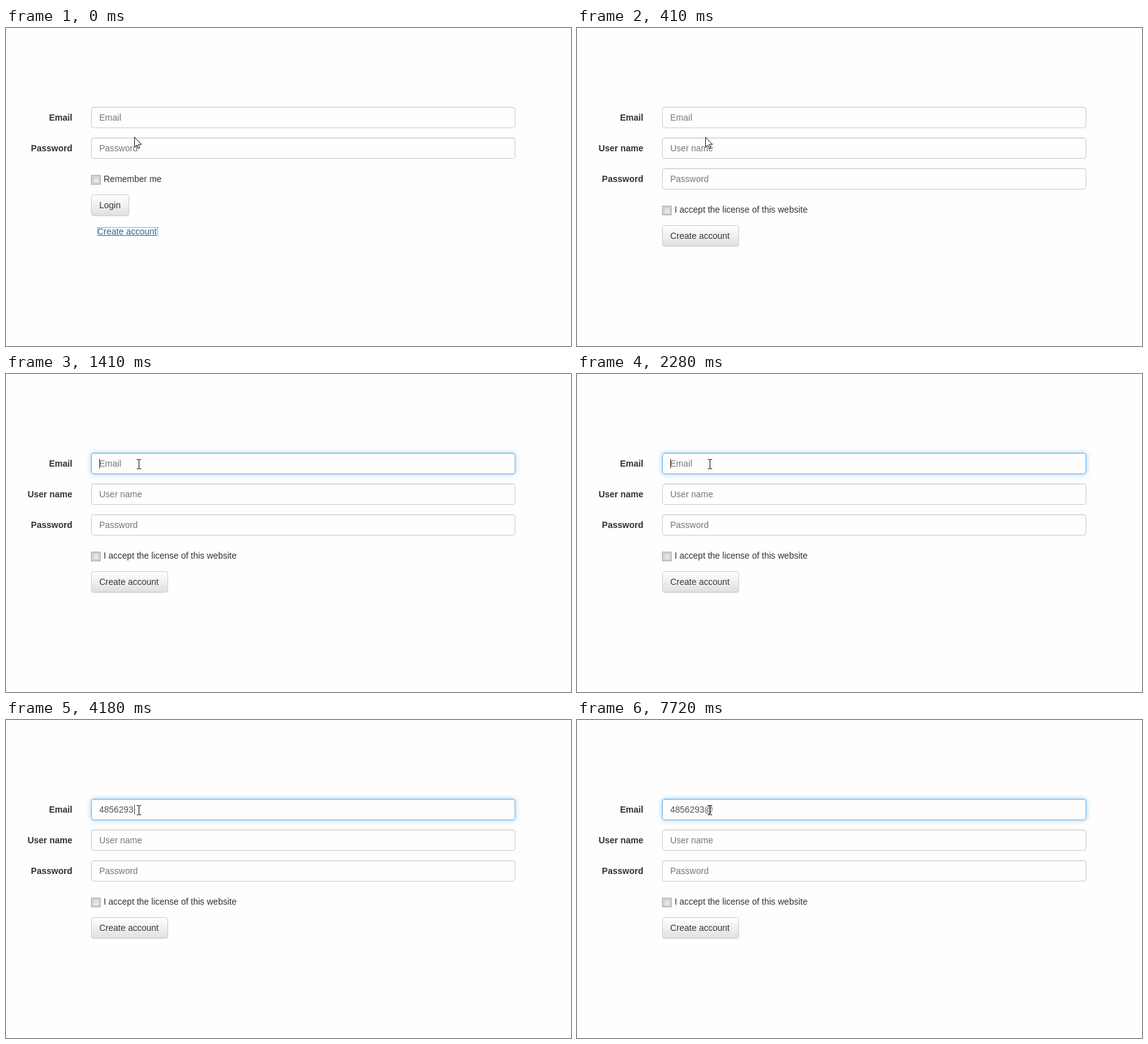
An HTML page that plays this animation: 903x508 px, repeating every 8 s.

```html
<!DOCTYPE html>
<html lang="en">
<head>
<meta charset="utf-8">
<title>Account form</title>
<style>
  html, body { margin: 0; width: 100%; height: 100%; overflow: hidden; background: #fefefe; }
  body { position: relative; font: 14px/20px "Liberation Sans", Arial, sans-serif; color: #333; }
  body * { box-sizing: border-box; }
  .row, .row > *, .check, .button, #link, #ring, #caret, svg { position: absolute; white-space: nowrap; }
  .row { left: 0; width: 903px; height: 34px; }
  .row b { right: 797px; top: 7px; }
  .field {
    left: 136px; width: 678px; height: 34px; padding: 6px 12px;
    border: 1px solid #ccc; border-radius: 4px; color: #777;
    box-shadow: inset 0 1px 1px rgba(0, 0, 0, .075);
  }
  .field.focusing { border-color: #aac1d6; }
  .field.focused {
    border-color: #66afe9;
    box-shadow: inset 0 1px 1px rgba(0, 0, 0, .075), 0 0 8px rgba(102, 175, 233, .6);
  }
  .field.typed { color: #555; }
  .check { left: 156px; }
  .check::before {
    content: ""; position: absolute; left: -20px; top: 4px; width: 13px; height: 13px;
    border: 1px solid #8e8f8f; box-shadow: inset 0 0 0 1px #f4f4f4, inset 0 0 0 2px #b4b8bc;
    background: linear-gradient(135deg, #cfd2d5, #f4f4f4);
  }
  .button {
    left: 136px; height: 34px; padding: 6px 12px; border: 1px solid #ccc; border-radius: 4px;
    background: linear-gradient(#fff, #e0e0e0); text-shadow: 0 1px 0 #fff;
    box-shadow: inset 0 1px 0 rgba(255, 255, 255, .15), 0 1px 1px rgba(0, 0, 0, .075);
  }
  #link { left: 146px; top: 315px; color: #337ab7; }
  #link.focused { color: #2a6496; text-decoration: underline; }
  #ring { left: 146px; top: 318px; width: 97px; height: 14px; border: 1px dotted #2a6496; }
  #caret { top: 135px; width: 1px; height: 16px; background: #444; }
  svg { left: 0; top: 0; }
  [hidden] { display: none !important; }
</style>
</head>
<body>
<div class="row" style="top:126px"><b>Email</b><div class="field" id="email">Email</div></div>

<div id="login">
  <div class="row" style="top:175px"><b>Password</b><div class="field">Password</div></div>
  <div class="check" style="top:231px">Remember me</div>
  <div class="button" style="top:266px;width:61px">Login</div>
  <div id="link">Create account</div>
  <div id="ring"></div>
</div>

<div id="register">
  <div class="row" style="top:175px"><b>User name</b><div class="field">User name</div></div>
  <div class="row" style="top:224px"><b>Password</b><div class="field">Password</div></div>
  <div class="check" style="top:280px">I accept the license of this website</div>
  <div class="button" style="top:315px;width:123px">Create account</div>
</div>

<div id="caret"></div>
<svg width="903" height="508">
  <path id="arrow" transform="translate(205 174)" fill="#fff" stroke="#111"
    d="M.5 .5V16.5L4.2 13L6.6 18.5L8.8 17.5L6.5 12H11.5Z"/>
  <path id="beam" fill="#000" d="M0 0h3v1h-3zM4 0h3v1h-3zM3 1h1v14h-1zM0 15h3v1h-3zM4 15h3v1h-3z"/>
</svg>

<script>
  const LOOP = 8000;
  const ADDRESS = "4856293@";
  const keyTimes = [0, 2830, 2950, 3100, 3780, 3930, 4180, 5000];
  const caretFlips = [1260, 1820, 2280, 3510, 3780, 4580, 5000, 5530, 6080, 6610, 7160, 7720];
  const beamStops = [[810, 207, 149], [960, 209, 138], [1120, 209, 136]];

  const $ = id => document.getElementById(id);
  const show = (id, visible) => $(id).toggleAttribute("hidden", !visible);
  const countPassed = (times, t) => times.filter(time => time <= t).length;

  function render(t) {
    show("login", t < 410);
    show("register", t >= 410);
    show("ring", t < 250);
    $("link").className = t < 250 ? "focused" : "";

    const stop = beamStops.filter(([time]) => time <= t).pop();
    $("arrow").style.display = stop ? "none" : "";
    $("beam").style.display = stop ? "" : "none";
    if (stop) $("beam").setAttribute("transform", `translate(${stop[1]} ${stop[2]})`);

    // The first two characters appear together.
    const typed = t < keyTimes[1] ? 0 : countPassed(keyTimes, t);
    const email = $("email");
    email.textContent = ADDRESS.slice(0, typed) || "Email";
    email.className = "field" + (t >= 1410 ? " focused" : t >= 1260 ? " focusing" : "") + (typed ? " typed" : "");

    show("caret", countPassed(caretFlips, t) % 2 === 1);
    $("caret").style.left = (typed === ADDRESS.length ? 219 : 149 + 8 * typed) + "px";
  }

  const start = performance.now();
  function frame() {
    render((performance.now() - start) % LOOP);
    requestAnimationFrame(frame);
  }
  frame();
</script>
</body>
</html>
```
